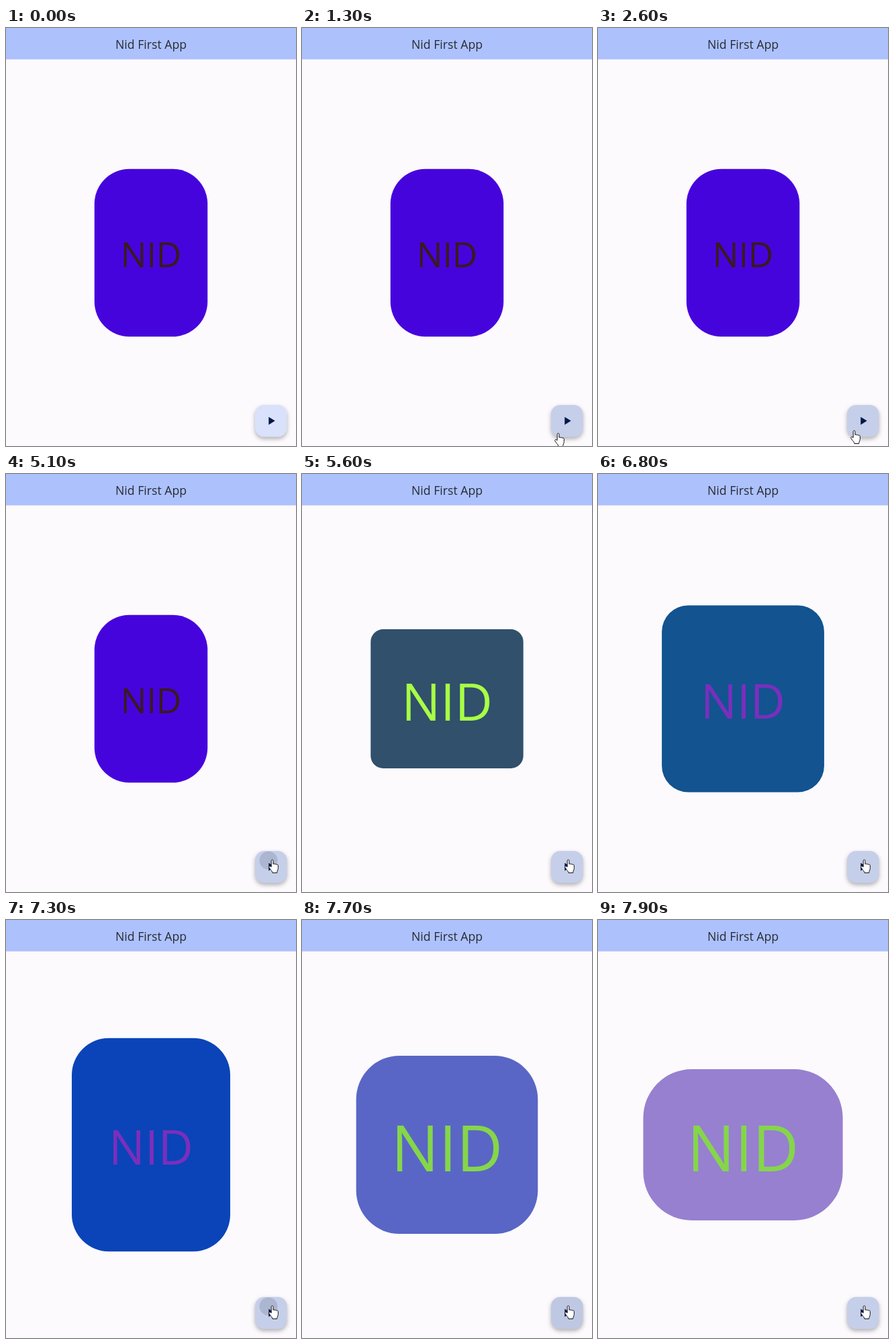
Animation, 432 px wide and 622 px high, one loop 8000 ms. Source, as an HTML page:

```html
<!DOCTYPE html>
<html lang="en">
<head>
<meta charset="utf-8">
<title>Nid First App</title>
<style>
  html, body { margin: 0; height: 100%; overflow: hidden; background: #fcfafd; }
  svg { display: block; width: 432px; height: 622px; }
  text { font-family: "Open Sans", "Noto Sans", sans-serif; text-anchor: middle; }
  #fab { filter: drop-shadow(0 3px 3px rgba(0, 0, 0, .3)); }
</style>
</head>
<body>
<svg viewBox="0 0 432 622">
  <clipPath id="fabClip"><rect x="371" y="561" width="47.5" height="47.5" rx="13.4"/></clipPath>
  <rect width="432" height="622" fill="#fcfafd"/>
  <rect width="432" height="46.7" fill="#adc2fd"/>
  <text x="216" y="31" font-size="17.7" fill="#272a35">Nid First App</text>
  <rect id="box"/>
  <text id="label" x="216">NID</text>
  <rect id="fab" x="371" y="561" width="47.5" height="47.5" rx="13.4" fill="#d9e1fb"/>
  <g clip-path="url(#fabClip)" fill="#001030">
    <rect id="hover" x="371" y="561" width="48" height="48"/>
    <circle id="splash"/>
  </g>
  <path d="M391.3 578.8v11.6l9.4-5.8z" fill="#001849"/>
  <path id="hand" fill="#fff" stroke="#111" stroke-linejoin="round"
    d="M4.2 11V2a1.4 1.4 0 0 1 2.8 0v5c.3-.8 2.3-.8 2.5.3.5-.8 2.3-.5 2.5.6.6-.6 2.4-.3 2.4 1V13c0 3-1.8 4-1.8 7H6c0-2-2-3.5-3-5L.9 12c-.8-1.5 1-2.8 2.2-1.6z"/>
</svg>
<script>
const LOOP = 8000, STEP = 100, MOVE = 1000, CX = 216, CY = 334.5;

// Each tap sets a new box (eased) and a new label style (immediate).
const states = [
  { at: 0, box: [168.5, 249.5, 52, 70, 4, 221], size: 51.3, ink: '#3b1a1c' },
  { at: 5165, box: [255.2, 187, 3, 37, 116, 54], size: 77, ink: '#a8ff45' },
  { at: 6355, box: [236, 317.5, 55, 10, 68, 184], size: 71.5, ink: '#7a2fbc' },
  { at: 7365, box: [311, 204, 76, 183, 142, 213], size: 94.5, ink: '#85d64a' }
];
const presses = [[5100, 5165], [6270, 6355], [7300, 7365]];
const hands = [[1100, 376, 602], [2600, 376, 598], [3900, 391, 573]];

const $ = id => document.getElementById(id);
const clamp = v => Math.min(1, Math.max(0, v));
const lerp = (a, b, k) => a + (b - a) * k;
const set = (id, attrs) => {
  for (const k in attrs) $(id).setAttribute(k, attrs[k]);
};

// cubic-bezier(.4, 0, .2, 1)
function ease(x) {
  let lo = 0, hi = 1, s = .5;
  for (let i = 0; i < 20; i++) {
    s = (lo + hi) / 2;
    const bx = 1.2 * (1 - s) ** 2 * s + .6 * (1 - s) * s * s + s ** 3;
    if (bx < x) lo = s; else hi = s;
  }
  return s * s * (3 - 2 * s);
}

function drawBox(t) {
  const i = states.findLastIndex(s => t >= s.at);
  const now = states[i], from = states[Math.max(0, i - 1)];
  const k = ease(clamp((t - now.at) / MOVE));
  const [w, h, r, ...rgb] = now.box.map((v, j) => lerp(from.box[j], v, i ? k : 1));
  set('box', {
    x: CX - w / 2, y: CY - h / 2, width: w, height: h, rx: r,
    fill: `rgb(${rgb.map(Math.round)})`
  });
  set('label', { y: CY + now.size * .418, 'font-size': now.size, fill: now.ink });
}

function drawButton(t) {
  set('hover', { opacity: .085 * clamp((t - 1050) / 150) });
  const press = presses.findLast(p => t >= p[0]);
  const since = press ? t - press[1] : LOOP;
  const grow = clamp(since / 225);
  const k = 1 - (1 - grow) ** 2;
  set('splash', {
    cx: lerp(391, 394.7, k), cy: lerp(575, 584.7, k), r: lerp(13.5, 42, k),
    opacity: .13 * (1 - clamp((since - 225) / 150))
  });
}

function drawHand(t) {
  const pos = hands.findLast(h => t >= h[0]);
  set('hand', {
    visibility: pos ? 'visible' : 'hidden',
    transform: pos ? `translate(${pos[1]} ${pos[2] + .5})` : ''
  });
}

const start = performance.now();
function frame() {
  const t = Math.floor((performance.now() - start) % LOOP / STEP) * STEP;
  drawBox(t);
  drawButton(t);
  drawHand(t);
  requestAnimationFrame(frame);
}
frame();
</script>
</body>
</html>
```
